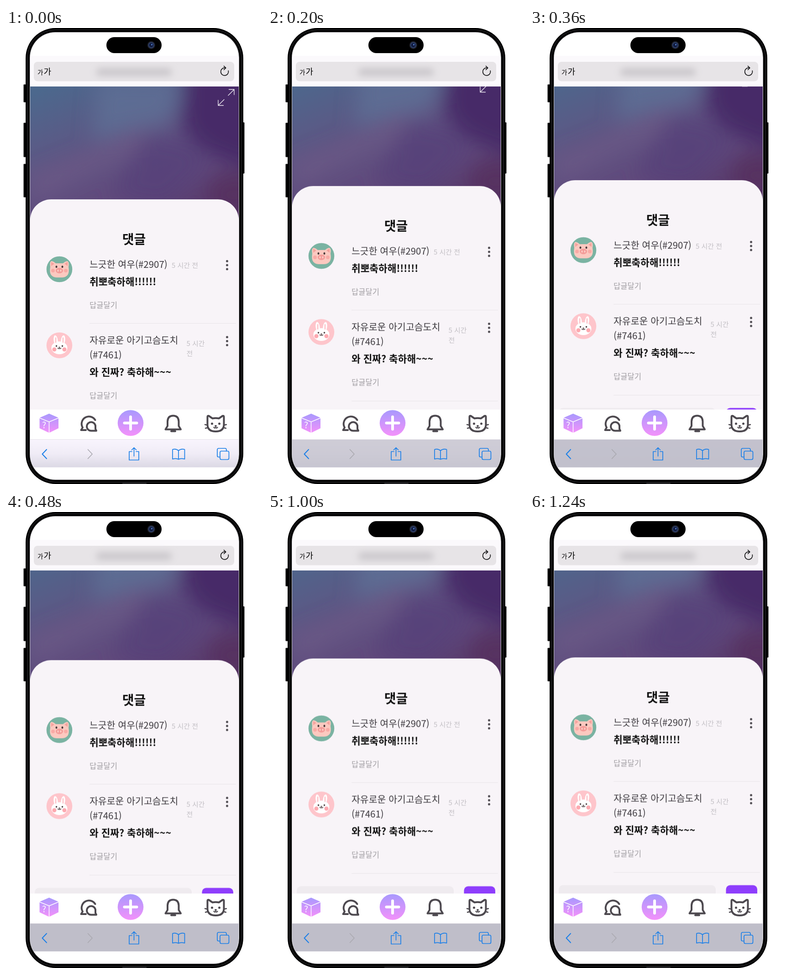
Recreate the animation shown at these times as an HTML page. Size 561 px wide and 998 px high, loop 1280 ms.

```html
<!DOCTYPE html>
<html lang="ko">
<head>
<meta charset="utf-8">
<title>댓글</title>
<style>
  html, body { margin: 0; width: 100%; height: 100%; overflow: hidden; background: #fff; }
  svg { display: block; width: 100vw; height: 100vh; }
  text { font-family: "Noto Sans CJK KR", "Noto Sans CJK", sans-serif; }
  .title { font-size: 28px; font-weight: 700; text-anchor: middle; fill: #111; }
  .name { font-size: 20.5px; fill: #3c393e; }
  .message { font-size: 21.4px; font-weight: 700; fill: #111; }
  .time { font-size: 15px; fill: #c2bfc4; }
  .reply { font-size: 16.6px; fill: #a19ea3; }
  .line { fill: none; stroke-linecap: round; stroke-linejoin: round; }
  .nav { stroke: #4d494f; stroke-width: 4; }
  .browser { stroke: #1a7fe8; stroke-width: 1.7; }

  /* Every segment advances in 40 ms steps. */
  .scroll { animation: scroll 1280ms infinite; }
  .shade { animation: shade 1280ms infinite; }
  @keyframes scroll {
    0% { transform: translateY(0); animation-timing-function: steps(3, end); }
    9.375% { transform: translateY(-22.3px); animation-timing-function: steps(4, end); }
    21.875% { transform: translateY(-36px); animation-timing-function: steps(5, end); }
    37.5% { transform: translateY(-50.8px); animation-timing-function: steps(2, end); }
    43.75% { transform: translateY(-53px); animation-timing-function: steps(3, end); }
    53.125% { transform: translateY(-54px); animation-timing-function: steps(4, end); }
    65.625%, 78.125% { transform: translateY(-54.4px); animation-timing-function: steps(6, end); }
    96.875%, 100% { transform: translateY(-56.8px); }
  }
  @keyframes shade {
    0% { opacity: 0; animation-timing-function: steps(3, end); }
    9.375% { opacity: .6; animation-timing-function: steps(4, end); }
    21.875% { opacity: .88; animation-timing-function: steps(5, end); }
    37.5%, 100% { opacity: 1; }
  }
</style>
</head>
<body>
<svg viewBox="0 0 561 998" preserveAspectRatio="none">
  <defs>
    <linearGradient id="violet" x2="0" y2="1">
      <stop stop-color="#a899fd"/><stop offset="1" stop-color="#f391fa"/>
    </linearGradient>
    <linearGradient id="wall" x1=".1" x2=".65" y2="1">
      <stop stop-color="#4c688d"/><stop offset=".4" stop-color="#5f5684"/>
      <stop offset=".7" stop-color="#614a7c"/><stop offset="1" stop-color="#553668"/>
    </linearGradient>
    <linearGradient id="toolbar" x2="0" y2="1">
      <stop stop-color="#f8f4fd"/><stop offset=".5" stop-color="#f0ecf6"/><stop offset="1" stop-color="#dcd9e5"/>
    </linearGradient>
    <filter id="soft" x="-60%" y="-60%" width="220%" height="220%"><feGaussianBlur stdDeviation="22"/></filter>
    <filter id="smudge" x="-20%" y="-150%" width="140%" height="400%"><feGaussianBlur stdDeviation="8"/></filter>
    <clipPath id="screen"><rect x="53" y="10" width="456.5" height="978" rx="55"/></clipPath>
    <clipPath id="page"><rect x="53" y="128" width="456.5" height="707"/></clipPath>
    <g id="dots" fill="#514d53">
      <circle cy="-8.7" r="2.5"/><circle r="2.5"/><circle cy="8.7" r="2.5"/>
    </g>
  </defs>

  <!-- Phone body -->
  <g>
    <path d="M43 124h-4v38h4M43 208h-4v74h4M43 298h-4v72h4M519 207h3v111h-3" stroke="#000" stroke-width="1"/>
    <rect x="43" y="0" width="477" height="998" rx="66"/>
    <rect x="47" y="4" width="469" height="990" rx="61" fill="none" stroke="#36363a" stroke-width="1"/>
    <rect x="52" y="9" width="459" height="980" rx="56" fill="#c9c8cc"/>
    <rect x="53" y="10" width="456.5" height="978" rx="55" fill="#fff"/>
  </g>

  <g clip-path="url(#screen)">
    <!-- Address bar -->
    <rect x="53" y="61" width="457" height="67" fill="#fbf9fc"/>
    <rect x="61" y="74" width="439" height="42.5" rx="8" fill="#e7e4e7"/>
    <text x="69" y="102" font-size="13.5">가</text>
    <text x="82.5" y="102" font-size="18">가</text>
    <rect x="198" y="89" width="165" height="15" rx="7" fill="#c6c3c7" filter="url(#smudge)"/>
    <path class="line" d="M480 87.2a8.4 8.4 0 1 0 7.3 6.4M477.5 83.3l4.3 4-4.3 4" stroke="#18181a" stroke-width="1.7"/>

    <!-- Scrolling page -->
    <g clip-path="url(#page)">
      <g class="scroll">
        <rect x="53" y="128" width="457" height="330" fill="url(#wall)"/>
        <g filter="url(#soft)">
          <path d="M200 110H384Q385 175 345 212 270 215 190 250Z" fill="#5e7096" opacity=".8"/>
          <path d="M392 80H560V310Q440 300 385 215Z" fill="#472968"/>
          <path d="M55 325Q190 275 310 215L300 265Q180 310 60 380Z" fill="#705b88" opacity=".65"/>
          <path d="M300 240Q400 225 445 300L350 390 230 370Z" fill="#553f7a" opacity=".7"/>
          <ellipse cx="500" cy="365" rx="60" ry="45" fill="#573260"/>
        </g>
        <path class="line" d="M487 147.5l13-13M488.500 134.500h11.500v11.500M478 156.500l-13 13M465 158v11.500h11.500" stroke="#f1eef4" stroke-width="1.3"/>

        <path d="M53 920V420A46 45 0 0 1 99 375H464A46 45 0 0 1 510 420V920Z" fill="#f8f4f8"/>
        <text class="title" x="280.500" y="473">댓글</text>

        <!-- Pig comment -->
        <g transform="translate(117 528)">
          <circle r="28.300" fill="#7ab3a2"/>
          <path d="M-20-5Q-22-17-17-18-12-17-8-13H8Q12-17 17-18 22-17 20-5 24 17 6 18H-6Q-24 17-20-5Z" fill="#fcc9c0"/>
          <path d="M-18-16l7 4-7 5ZM18-16l-7 4 7 5Z" fill="#f5a29d"/>
          <circle cx="-14" cy="3" r="4" fill="#f9aaa5"/><circle cx="14" cy="3" r="4" fill="#f9aaa5"/>
          <ellipse cy="3" rx="8" ry="6" fill="#f49b98"/>
          <ellipse cx="-3" cy="3" rx="1.600" ry="2.600" fill="#fbd0c8"/><ellipse cx="3" cy="3" rx="1.600" ry="2.600" fill="#fbd0c8"/>
          <ellipse cx="-6.500" cy="-5.500" rx="2" ry="2.500" fill="#433536"/><ellipse cx="6.500" cy="-5.500" rx="2" ry="2.500" fill="#433536"/>
        </g>
        <text class="name" x="183" y="524.700">느긋한 여우(#2907)</text>
        <text class="time" x="363" y="525">5 시간 전</text>
        <text class="message" x="183" y="563">취뽀축하해!!!!!!</text>
        <text class="reply" x="183" y="612.500">답글달기</text>
        <use href="#dots" x="484.500" y="519"/>
        <rect x="183" y="646" width="321" height="1" fill="#e8e4e9"/>

        <!-- Rabbit comment -->
        <g transform="translate(117 694.500)">
          <circle r="28.300" fill="#fec5cb"/>
          <g fill="#fff">
            <ellipse cx="-8" cy="-11" rx="4.500" ry="11" transform="rotate(-8 -8 -11)"/>
            <ellipse cx="8" cy="-11" rx="4.500" ry="11" transform="rotate(8 8 -11)"/>
            <ellipse cy="5.500" rx="17.500" ry="14"/>
          </g>
          <path class="line" d="M-8-16v9M8-16v9" stroke="#fdc7cd" stroke-width="3"/>
          <circle cx="-11" cy="9" r="4.500" fill="#fda9b0"/><circle cx="11" cy="9" r="4.500" fill="#fda9b0"/>
          <circle cx="-6.500" cy="1.500" r="1.800" fill="#493b3d"/><circle cx="6.500" cy="1.500" r="1.800" fill="#493b3d"/>
          <path class="line" d="M-1 4h2M0 4v2.500M-3.500 6q2 2.500 3.500.5 1.500 2 3.500-.5" stroke="#493b3d" stroke-width="1.400"/>
        </g>
        <text class="name" x="183" y="691.200">자유로운 아기고슴도치</text>
        <text class="name" x="183" y="723">(#7461)</text>
        <text class="time" x="395.500" y="696.300">5 시간</text>
        <text class="time" x="395.500" y="718.300">전</text>
        <text class="message" x="183" y="761">와 진짜? 축하해~~~</text>
        <text class="reply" x="183" y="810.500">답글달기</text>
        <use href="#dots" x="484.500" y="685.300"/>
        <rect x="183" y="845" width="321" height="1" fill="#e8e4e9"/>

        <rect x="63" y="873.500" width="344" height="48" rx="9" fill="#efebef"/>
        <rect x="429.500" y="873.500" width="68.500" height="48" rx="9" fill="#8e3dfc"/>
      </g>
    </g>

    <!-- App navigation -->
    <rect x="53" y="835" width="457" height="66" fill="#fff"/>
    <path d="M94.500 844L115 853V876L94.500 886 73.500 876V853Z" fill="url(#violet)"/>
    <path class="line" d="M73.500 853.500L94.500 862 115 853.500M94.500 862V886" stroke="#fff" stroke-width="1.500"/>
    <text x="83.500" y="876" font-size="19" font-weight="500" text-anchor="middle" fill="#fff">?</text>

    <g class="line nav">
      <path d="M175 880H164.500L168 874.500A16 16 0 1 1 195.500 858"/>
      <path d="M195 881.500H186.500A9.500 9.500 0 1 1 196 873V877.500L198 881.500Z"/>
      <path d="M349.500 878.500H383L378.500 871V861Q378 848.500 366.300 848.500 354.500 848.500 354 861V871ZM362 882.500H371"/>
    </g>
    <circle cx="273" cy="864.500" r="28.300" fill="url(#violet)"/>
    <path class="line" d="M259.500 864.500H286.500M273 851V878" stroke="#fff" stroke-width="6"/>

    <g transform="translate(459.500 866)">
      <path class="line nav" stroke-width="3.600" d="M-18 3V-15Q-18-18-15-17L-7-11.500Q0-13 7-11.500L15-17Q18-18 18-15V3Q17 17 0 17-17 17-18 3Z"/>
      <path class="line" d="M-23.500 2l6 1M-22.500 10l6-1.500M23.500 2l-6 1M22.500 10l-6-1.500M-4 8q2.500 3 4 0 1.500 3 4 0" stroke="#4d494f" stroke-width="2.400"/>
      <g fill="#4d494f"><circle cx="-8" cy="0" r="2.500"/><circle cx="8" cy="0" r="2.500"/><ellipse cy="5" rx="2.500" ry="2"/></g>
    </g>

    <!-- Browser toolbar -->
    <rect x="53" y="901" width="457" height="60.500" fill="url(#toolbar)"/>
    <rect class="shade" x="53" y="901" width="457" height="60.500" fill="#bfbec9"/>
    <rect x="53" y="900" width="457" height="1" fill="#e5e2e8"/>
    <g class="line browser">
      <path d="M89 922.500L79.500 932.500 89 942.500" stroke-width="2"/>
      <path d="M179.500 922.500L189 932.500 179.500 942.500" stroke="#aaa9b0"/>
      <path d="M276 927H270V945.500H291V927H285M280.500 937V918.500M275.500 923.500L280.500 918.500 285.500 923.500"/>
      <path d="M378 925Q372 920 365 922.500V943.500Q373 941 378 944 383 941 391.500 943.500V922.500Q384 920 378 925V944"/>
      <rect x="469" y="926" width="19.500" height="18.500" rx="3"/>
      <path d="M469 939H466Q463 939 463 936V923Q463 920 466 920H480Q483 920 483 923V926"/>
    </g>
  </g>

  <!-- Camera island and port -->
  <rect x="220" y="20" width="121" height="35" rx="17.500"/>
  <circle cx="318.300" cy="37.500" r="8.500" fill="#22252f"/>
  <circle cx="318.300" cy="37.500" r="5.500" fill="#101a3c" stroke="#304577" stroke-width="1.500"/>
  <circle cx="319.500" cy="36.500" r="1.800" fill="#4b72b8"/>
  <rect x="255" y="995.500" width="53" height="2.500" fill="#28282b"/>
</svg>
</body>
</html>
```
